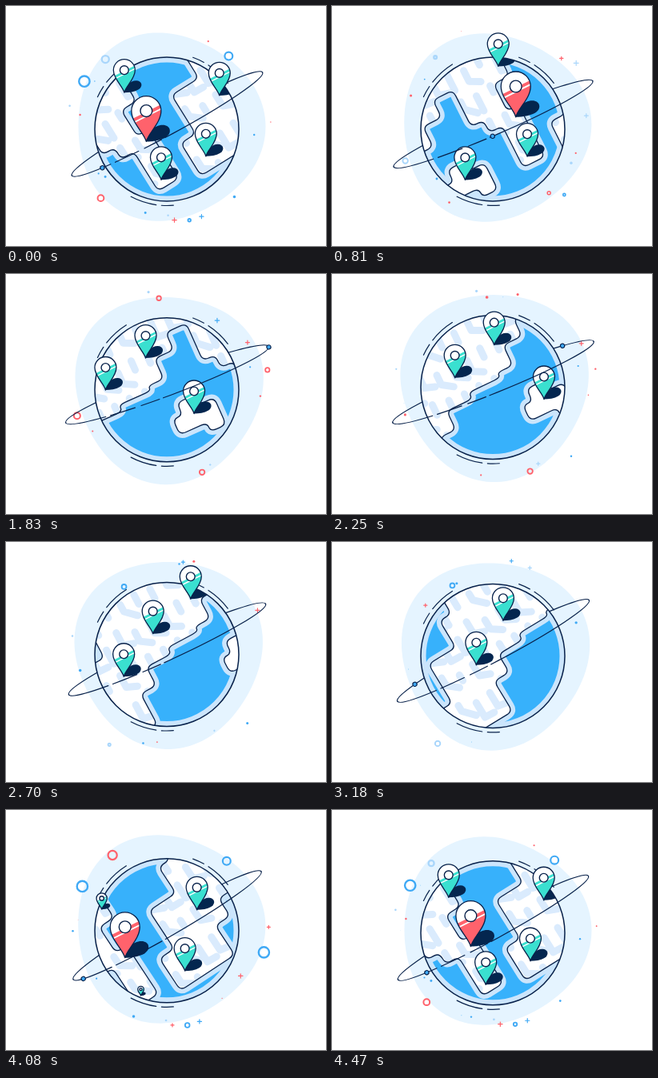
These frames come from a looping animation (400x300 px, 4.5 s). An HTML page with a canvas:

```html
<!DOCTYPE html>
<html lang="en">
<head>
<meta charset="utf-8">
<title>Globe with map pins</title>
<style>
  html, body { margin: 0; width: 100%; height: 100%; overflow: hidden; background: #fff; }
  canvas { display: block; }
</style>
</head>
<body>
<canvas id="stage" width="400" height="300"></canvas>
<script>
const ctx = document.getElementById('stage').getContext('2d');
const LOOP = 4500, SPAN = 346.5, R = 90, TAU = Math.PI * 2, DEG = Math.PI / 180;
const NAVY = '#08214a', OCEAN = '#37b1fb', COAST = '#cbe5fc', PATCH = '#daebfd', HALO = '#e5f4ff';
const TEAL = '#3ae0d0', RED = '#ff626c', BLUE = '#3fa9f5', PALE = '#a9d6fb';

const wave = (t, peak) => Math.cos(TAU * (t - peak) / LOOP);
const clamp = x => Math.max(0, Math.min(1, x));
const wrap = x => ((x + SPAN / 2) % SPAN + SPAN) % SPAN - SPAN / 2;

let seed = 11;
function random() {
  seed = (seed * 16807) % 2147483647;
  return seed / 2147483647;
}

function paint(path, fill, stroke, width = 1.3) {
  if (fill) { ctx.fillStyle = fill; ctx.fill(path); }
  if (stroke) { ctx.strokeStyle = stroke; ctx.lineWidth = width; ctx.stroke(path); }
}

function scene(...steps) {
  ctx.save();
  steps.forEach(step => step());
  ctx.restore();
}

function arc(x, y, r, from = 0, to = TAU) {
  const p = new Path2D();
  p.arc(x, y, r, from, to);
  return p;
}

// Closed coast of right-angled steps with round corners: x, y, next x, next y, ...
function coast(...steps) {
  const points = steps.slice(1).map((s, i) => i % 2 ? [s, steps[i]] : [steps[i], s]);
  const n = points.length, p = new Path2D();
  points.forEach(([x, y], i) => {
    const toward = ([px, py]) => {
      const d = Math.hypot(px - x, py - y) || 1, k = Math.min(8, d / 2) / d;
      return [x + (px - x) * k, y + (py - y) * k];
    };
    p.lineTo(...toward(points[(i + n - 1) % n]));
    p.quadraticCurveTo(x, y, ...toward(points[(i + 1) % n]));
  });
  p.closePath();
  return p;
}

// The map is a flat strip that slides under the round outline.
const mainland = coast(-14, -110, -14, -50, -36, -12, -20, 60, -50, 2, -68, -15, -85, -66, -113, -42,
  -139, -14, -160, -7, -203, 2, -238, 28, -260, 72, -341, 24, -319, -33, -279, -72, -262, -110);
const island = coast(-136, 20, -112, 33, -91, 70, -112, 58, -149, 37, -136);
const lands = [mainland, island];

const patches = new Path2D();
for (let x = -335; x < 0; x += 21) {
  for (let y = -92 + random() * 12; y < 70; y += 34 + random() * 8) {
    patches.moveTo(x, y);
    patches.lineTo(x, y + 8 + random() * 14);
    if (random() < .6) patches.lineTo(x + 13, y + 22);
  }
}

const pins = [
  [-21, -67], [-149, -47], [-211, -31], [-268.5, -1], [-30, -.5, RED], [-122, 41], [-39.5, 50], [-323, 54.5]
];

const sparks = Array.from({ length: 62 }, (_, i) => {
  const a = i * 2.4, far = 104 + random() * 26, kind = random();
  return {
    x: 203 + far * Math.cos(a), y: 148 + far * Math.sin(a), born: random() * LOOP,
    kind: kind < .62 ? 'dot' : kind < .8 ? 'ring' : 'plus',
    size: random(), color: [RED, BLUE, BLUE, RED, PALE][i % 5]
  };
});

function drawHalo(t, y) {
  const p = new Path2D(), turn = (105 + 15 * wave(t, 200)) * DEG;
  for (let a = 0; a < TAU; a += .05) {
    const r = 117 + 4.5 * Math.cos(3 * (a - turn));
    p.lineTo(203 + r * Math.cos(a), y + r * Math.sin(a));
  }
  paint(p, HALO);
}

function drawSparks(t) {
  for (const { x, y, born, kind, size, color } of sparks) {
    const age = (t - born + LOOP) % LOOP, grow = clamp(age / 180) * clamp((1000 - age) / 180);
    if (!grow) continue;
    const px = x + age * .006, py = y - age * .003;
    if (kind === 'dot') paint(arc(px, py, (1 + size * .8) * grow), color);
    else if (kind === 'ring') paint(arc(px, py, (2 + size * size * 5) * grow), null, color, 1.4 + size);
    else {
      const r = (2 + size) * grow;
      paint(new Path2D(`M${px - r} ${py}h${2 * r}M${px} ${py - r}v${2 * r}`), null, color, 1.2);
    }
  }
}

function drawLands() {
  for (const land of lands) paint(land, null, COAST, 12.5);
  for (const land of lands) paint(land, '#fff');
  scene(() => ctx.clip(mainland), () => paint(patches, null, PATCH, 9));
  for (const land of lands) paint(land, null, NAVY);
}

function drawMap(shift, tilt) {
  paint(arc(0, 0, R), OCEAN, COAST, 13);
  ctx.rotate(-tilt);
  for (const k of [-1, 0, 1]) scene(() => ctx.translate(shift + k * SPAN, 0), drawLands);
}

function drawRim() {
  paint(arc(0, 0, R), null, NAVY, 1.5);
  for (const a of [-70, 85, 205]) {
    paint(arc(0, 0, 95.5, a * DEG, (a + 9) * DEG), null, NAVY, 1.2);
    paint(arc(0, 0, 95.5, (a + 13) * DEG, (a + 33) * DEG), null, NAVY, 1.2);
  }
}

const drop = new Path2D('M0 0C-2-8-13.5-17-13.5-28A13.5 13.5 0 0 1 13.5-28C13.5-17 2-8 0 0Z');
const gloss = new Path2D('M-16-19L16-35V-50H-16Z');
const streak = new Path2D('M-16-15L16-31');
const shadow = new Path2D('M0 0C1-8 7-15 15-15C22-15 24-8 18-4C13-1 6 0 0 0Z');

function drawPin(color, scale) {
  paint(drop, color);
  scene(() => ctx.clip(drop), () => paint(gloss, '#fff'), () => paint(streak, null, '#fff', 1.4));
  paint(drop, null, NAVY, 1.3 / scale);
  paint(arc(0, -28, 5.4), '#fff', NAVY, 1.4 / scale);
}

// Runs a painter at the foot of each pin that is on the near side.
function eachPin(shift, tilt, painter) {
  for (const [x, v, color = TEAL] of pins) {
    const u = wrap(x + shift), size = clamp((90 - Math.hypot(u, v)) / 9);
    if (!size) continue;
    const scale = size * (color === RED ? 1.37 : 1), c = Math.cos(tilt), s = Math.sin(tilt);
    scene(() => ctx.translate(u * c + v * s, v * c - u * s), () => ctx.scale(scale, scale),
      () => painter(color, scale));
  }
}

function drawOrbit(front) {
  const p = new Path2D();
  p.ellipse(0, 0, 135.5, 13.8, 0, Math.PI, front ? 0 : TAU, front);
  ctx.setLineDash(front ? [52, 6, 32, 8, 24, 5, 200] : []);
  paint(p, null, NAVY, 1.2);
  ctx.setLineDash([]);
}

function draw(t) {
  const globeY = 147.8 + 7.3 * wave(t, 400), shift = SPAN * t / LOOP;
  const tilt = (25.2 + 4.8 * wave(t, 3900)) * DEG, mapTilt = tilt + 3.5 * DEG;
  const moon = (-46 + 360 * t / LOOP - 24 * Math.sin(TAU * t / LOOP)) * DEG;

  const toGlobe = () => ctx.translate(201, globeY);
  const toOrbit = () => { ctx.translate(201.5, globeY - 6.5); ctx.rotate(-tilt); };
  const orbitHalf = front => scene(toOrbit, () => drawOrbit(front), () => {
    if (Math.cos(moon) > 0 === front) {
      paint(arc(135.5 * Math.sin(moon), 13.8 * Math.cos(moon), 2.6), BLUE, NAVY, 1.1);
    }
  });

  ctx.fillStyle = '#fff';
  ctx.fillRect(0, 0, 400, 300);
  ctx.lineCap = ctx.lineJoin = 'round';
  drawHalo(t, globeY - 3);
  drawSparks(t);
  orbitHalf(false);
  scene(toGlobe, () => {
    scene(() => ctx.clip(arc(0, 0, R)),
      () => scene(() => drawMap(shift, mapTilt)),
      () => eachPin(shift, mapTilt, () => paint(shadow, '#04264f')));
    drawRim();
    eachPin(shift, mapTilt, drawPin);
  });
  orbitHalf(true);
}

const start = performance.now();
function frame() {
  draw((performance.now() - start) % LOOP);
  requestAnimationFrame(frame);
}
frame();
</script>
</body>
</html>
```
